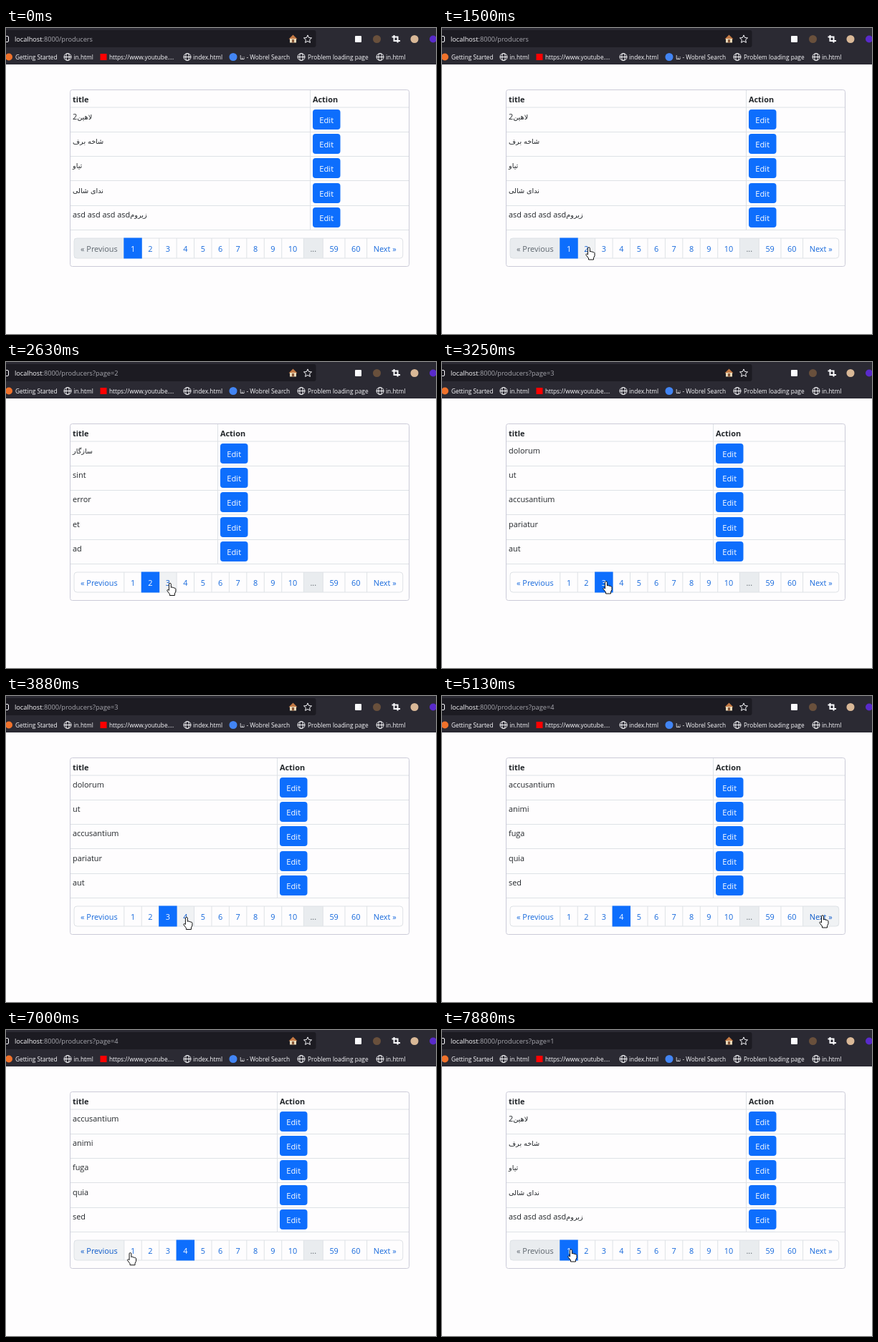
An HTML page for the animation above (8000 ms loop, 600 px wide and 428 px high).

```html
<!DOCTYPE html>
<html lang="en">
<head>
<meta charset="utf-8">
<title>Paginated table</title>
<style>
html, body { margin: 0; width: 100%; height: 100%; overflow: hidden; background: #fefdfe; }
svg { display: block; width: 600px; height: 428px; font: 10.9px "Open Sans", "DejaVu Sans", sans-serif; }
</style>
</head>
<body>
<svg viewBox="0 0 600 428"><g id="chrome"></g><g id="page"></g></svg>
<script>
const LOOP = 8000, STEP = 125, LOAD_DELAY = 375;
const BLUE = '#0d6efd', LINE = '#dee2e6', GREY = '#e9ecef', INK = '#212529', LIGHT = '#fbfbfe', PAPER = '#fefdfe';

const TITLES = {
  1: ['لاهین2', 'شاخه برف', 'تیاو', 'ندای شالی', 'asd asd asd asdزیروم'],
  2: ['سازگار', 'sint', 'error', 'et', 'ad'],
  3: ['dolorum', 'ut', 'accusantium', 'pariatur', 'aut'],
  4: ['accusantium', 'animi', 'fuga', 'quia', 'sed'],
  5: ['quibusdam', 'et', 'expedita', 'est', 'rerum']
};
const LABELS = ['« Previous', 1, 2, 3, 4, 5, 6, 7, 8, 9, 10, '...', 59, 60, 'Next »'];
const NEXT = LABELS.length - 1;

// The pointer enters the stage, then clicks at these times and places
const ENTRY = { time: 750, x: 448, y: 346 };
const CLICKS = [[1625, 205], [2875, 229], [4125, 252], [5250, 531], [6375, 150], [7500, 180]];
const REST_Y = 307;

const pageLayer = document.getElementById('page');

const rect = (x, y, w, h, fill, extra = '') =>
  `<rect x="${x}" y="${y}" width="${w}" height="${h}" fill="${fill}" ${extra}/>`;
const path = (d, stroke, extra = 'fill="none"') => `<path d="${d}" stroke="${stroke}" ${extra}/>`;
const disc = (x, y, r, fill) => `<circle cx="${x}" cy="${y}" r="${r}" fill="${fill}"/>`;
const text = (x, y, str, fill = INK, extra = '') =>
  `<text x="${x}" y="${y}" fill="${fill}" ${extra}>${str}</text>`;

// Persian runs are set a little smaller than Latin ones
const persian = str => str.replace(/[\u0600-\u06ff]+/g, '<tspan font-size="9.7">$&</tspan>');

function textWidth(str) {
  pageLayer.innerHTML = text(0, 0, str);
  return pageLayer.firstChild.getComputedTextLength();
}

// Cells are as wide as their label plus padding
const EDGES = [95];
LABELS.forEach((label, i) => EDGES.push(EDGES[i] + textWidth(label) + 18.2));

// Automatic table layout: columns share the width in proportion to their content
const SPLITS = {};
for (const page in TITLES) {
  const widest = 7 + Math.max(...TITLES[page].map(title => textWidth(persian(title))));
  SPLITS[page] = Math.floor(90 + 472 * widest / (widest + 45.5)) + .5;
}

const globe = x => `<g transform="translate(${x} 40.5)" fill="none" stroke="${LIGHT}">
  <circle r="5"/><ellipse rx="2.2" ry="5"/><path d="M-5 0H5"/></g>`;

function drawChrome() {
  const bookmark = (x, str) => text(x, 43.5, str, LIGHT, 'font-size="8.3"');
  const star = Array.from({ length: 10 }, (_, i) => {
    const a = i * Math.PI / 5, r = i % 2 ? 2.7 : 5.8;
    return `${421 + r * Math.sin(a)},${15.7 - r * Math.cos(a)}`;
  }).join(' ');
  return rect(0, 0, 600, 51, '#2b2a33') + rect(-6, 3, 438.5, 24, '#1c1b22', 'rx="3"') +
    rect(-4, 11.5, 7.5, 8, 'none', `rx="1.5" stroke="${LIGHT}"`) +
    path('M394.5 15.5 400.5 9.5 406.5 15.5Z', 'none', 'fill="#c47a45"') +
    rect(396, 15, 9, 5.5, '#ead9b8') + rect(399, 16, 3, 4.5, '#85573a') +
    `<polygon points="${star}" fill="none" stroke="${LIGHT}" stroke-linejoin="round"/>` +
    rect(487, 11, 9, 9, LIGHT, 'rx="1"') + disc(517.5, 15.5, 5.5, '#69503c') +
    path('M541.5 10V18H550M538.5 12.5H546.5V20.5', LIGHT, 'fill="none" stroke-width="2"') +
    disc(570, 15.5, 5.5, '#d9b897') + disc(596, 15.5, 5, '#592acb') +
    disc(4, 40.5, 5, '#f0722b') + rect(131.5, 36, 9, 9, '#f00') + disc(317, 40.5, 5.5, '#4285f4') +
    [86, 253, 412, 522].map(globe).join('') +
    bookmark(13, 'Getting Started') + bookmark(94.5, 'in.html') +
    bookmark(144, 'https://www.youtube.…') + bookmark(261, 'index.html') +
    bookmark(326, 'تنا - Wobrel Search') + bookmark(421, 'Problem loading page') + bookmark(530, 'in.html');
}

// Each move starts when the last page has loaded and ends one step before the click
function pointerAt(t) {
  if (t < ENTRY.time) return null;
  let { time, x, y } = ENTRY;
  for (const [click, goal] of CLICKS) {
    const arrival = click - STEP;
    if (t < arrival) {
      const k = Math.max(0, (t - time) / (arrival - time));
      const ease = 1 - (1 - k) ** 3;
      return [x + (goal - x) * ease, y + (REST_Y - y) * ease + 5 * Math.sin(Math.PI * k)];
    }
    [time, x, y] = [click + LOAD_DELAY, goal, REST_Y];
  }
  return [x, y];
}

const cellAtX = x => LABELS.findIndex((_, i) => x >= EDGES[i] && x < EDGES[i + 1]);
const cellAt = point => point && point[1] >= 294 && point[1] <= 322 ? cellAtX(point[0]) : -1;

function drawTable(page) {
  const split = SPLITS[page];
  let out = rect(89.5, 86.5, 473, 247, PAPER, 'rx="3" stroke="#cbcbd8"') +
    path(`M90 111H562M${split} 87V282`, LINE) +
    text(93, 104, 'title', INK, 'font-weight="700"') +
    text(split + 3.5, 104, 'Action', INK, 'font-weight="700"');
  TITLES[page].forEach((title, i) => {
    const y = Math.round(111 + i * 34.2);
    out += path(`M90 ${y + 34.5}H562`, LINE) + text(93, y + 17, persian(title)) +
      rect(split + 3.5, y + 3, 38.5, 28, BLUE, 'rx="4"') +
      text(split + 22.7, y + 22, 'Edit', '#fff', 'text-anchor="middle" font-size="11.2"');
  });
  return out;
}

function drawPagination(page, hover, focus) {
  const width = i => EDGES[i + 1] - EDGES[i];
  const label = (i, ink) => text(EDGES[i] + width(i) / 2, 313, LABELS[i], ink, 'text-anchor="middle"');
  let cells = '';
  LABELS.forEach((name, i) => {
    const disabled = name === '...' || (i === 0 && page === 1);
    const lit = i === hover || i === focus;
    const fill = disabled ? GREY : lit ? '#f0f2f4' : PAPER;
    const ink = disabled ? '#5c646c' : lit ? '#0a58ca' : '#1568dc';
    cells += rect(EDGES[i], 294, width(i), 28, fill) +
      (i ? path(`M${EDGES[i]} 294V322`, LINE) : '') + label(i, ink);
  });
  const total = EDGES[NEXT + 1] - EDGES[0];
  const ring = focus < 0 ? '' : rect(EDGES[focus] - 1.5, 292.5, width(focus) + 3, 31, 'none',
    `rx="2" stroke="${BLUE}" stroke-opacity=".25" stroke-width="3"`);
  return `<clipPath id="round">${rect(94.5, 293.5, total + 1, 29, '#fff', 'rx="4"')}</clipPath>
    <g clip-path="url(#round)">${cells}</g>` +
    rect(95, 294, total, 28, 'none', `rx="4" stroke="${LINE}"`) +
    rect(EDGES[page] - .5, 293.5, width(page) + 1, 29, BLUE) + label(page, '#fff') + ring;
}

function drawPointer(point) {
  if (!point) return '';
  const hand = 'M-1.5 10V1.3A1.45 1.45 0 0 1 1.4 1.3V6C2 5 4 5.2 4 6.5 4.5 5.6 6 6 6 7 7 6.4 8 7 8 8.2V11.5L6.5 14.5V17H-.5V15L-4 10.5C-4.5 9-3 8.4-1.5 10Z';
  const arrow = 'M0 0V13L3 10.3 5 15 7 14 5 9.6H9Z';
  const shape = cellAt(point) < 0 ? arrow : hand;
  return `<g transform="translate(${point})">${path(shape, '#111', 'fill="#fff" stroke-linejoin="round"')}</g>`;
}

function drawPage(t) {
  let page = 1, focus = -1, query = '';
  for (const [click, x] of CLICKS) {
    const cell = cellAtX(x), loaded = t >= click + LOAD_DELAY;
    if (t >= click && !loaded) focus = cell;
    if (loaded) {
      page = cell === 0 ? page - 1 : cell === NEXT ? page + 1 : cell;
      query = '?page=' + page;
    }
  }
  const url = `localhost<tspan fill="#a9a9b0">:8000/producers${query}</tspan>`;
  // Hover colour trails the pointer by one step
  return text(12, 19, url, LIGHT, 'font-size="9.2"') + drawTable(page) +
    drawPagination(page, cellAt(pointerAt(t - STEP)), focus) + drawPointer(pointerAt(t));
}

document.getElementById('chrome').innerHTML = drawChrome();
const start = performance.now();
let shown = -1;
function tick() {
  const t = Math.floor((performance.now() - start) % LOOP / STEP) * STEP;
  if (t !== shown) pageLayer.innerHTML = drawPage(shown = t);
  requestAnimationFrame(tick);
}
tick();
</script>
</body>
</html>
```
